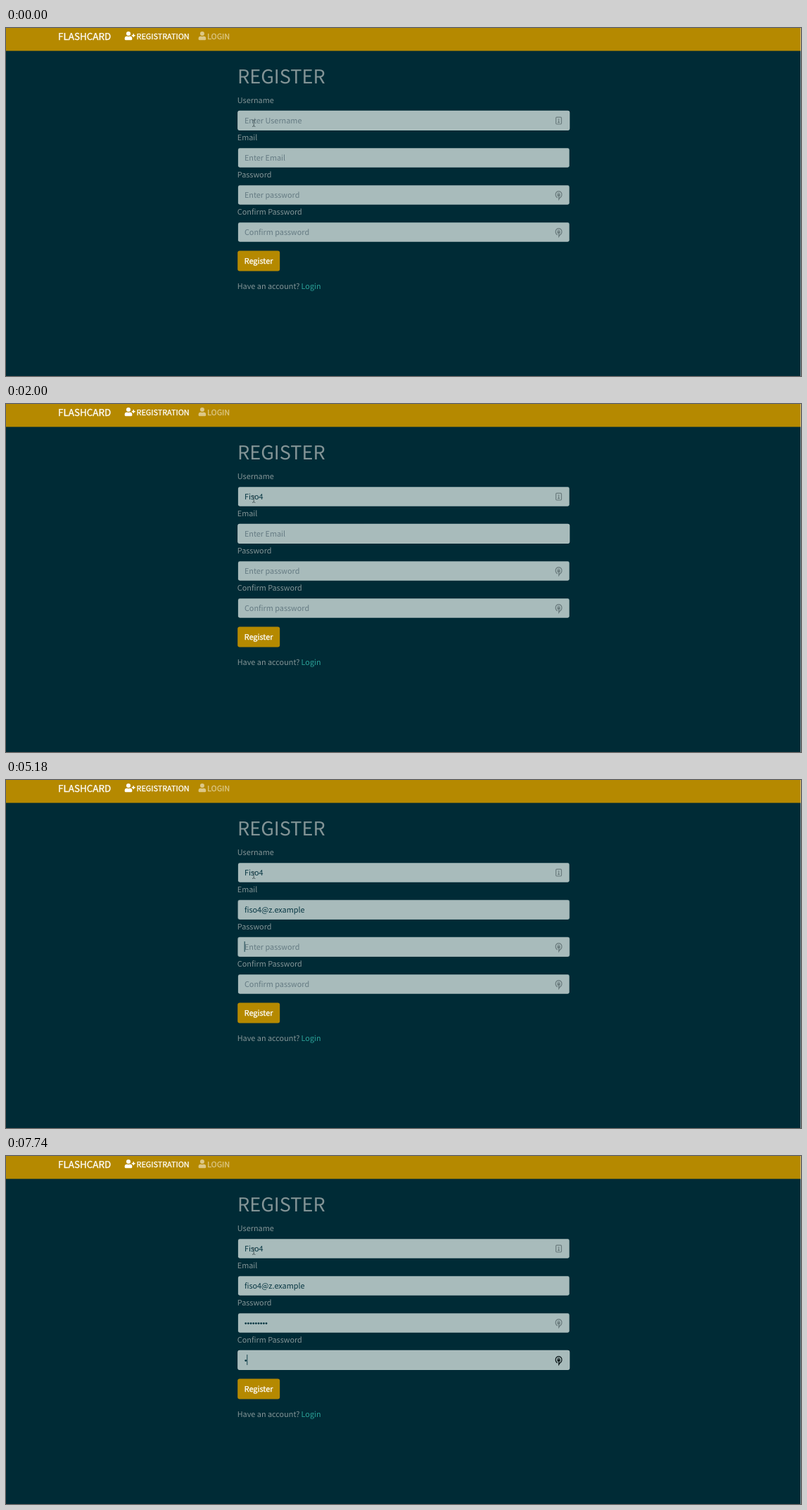
Animation of 1130x496 px, one loop 7.99 s. Source, as an HTML page:

```html
<!DOCTYPE html>
<html lang="en">
<head>
<meta charset="utf-8">
<title>Register form</title>
<style>
  html, body { margin: 0; width: 100%; height: 100%; overflow: hidden; background: #002b36; }
  svg { display: block; width: 1130px; height: 496px; }
  text {
    font: 10.86px "Noto Sans CJK JP", "Noto Sans CJK SC", "Noto Sans CJK", "Noto Sans", sans-serif;
    fill: #839496;
    text-rendering: geometricPrecision;
    white-space: pre;
  }
  .white { fill: #fff; }
  text.white { stroke: #fff; stroke-width: .3px; }
  .brand { font-size: 13.45px; }
  .title { font-size: 27.1px; }
  .link { fill: #2aa198; }
  .hint { fill: #657b83; }
  .value, .dot, .caret { fill: #073642; }
  .ring { fill: #bdcaca; }
  .box { fill: #a8bbbb; }
</style>
</head>
<body>
<svg id="stage" viewBox="0 0 1130 496">
  <defs>
    <g id="person">
      <circle cx="224" cy="128" r="128"/>
      <path d="M134 288h17q73 32 146 0h17q134 6 134 134v42q0 48-48 48H48q-48 0-48-48v-42q0-128 134-134z"/>
    </g>
    <g id="card" fill="none" stroke="currentColor">
      <rect x="-3.9" y="-4.9" width="7.8" height="9.8" rx="1.2" stroke-width="1.2"/>
      <path d="M0-.6V2.4M-1.4 2.6H1.4" stroke-width="1.3"/>
      <circle cy="-1.8" r=".6" stroke-width="1"/>
    </g>
    <g id="lock" fill="none" stroke="currentColor">
      <path d="M-1.8 3.7A4.4 4.8 0 1 1 1.8 3.7L.2 6V2" stroke-width="1.3"/>
      <path d="M-1.2-1.1V-2A1.2 1.2 0 0 1 1.2-2V-1.1" stroke-width="1"/>
      <rect x="-1.7" y="-1.1" width="3.4" height="2.7" fill="currentColor" stroke-width=".5"/>
    </g>
  </defs>

  <rect width="1130" height="496" fill="#002b36"/>
  <rect width="1130" height="32.6" fill="#b58900"/>
  <text class="white brand" x="74" y="16.6">FLASHCARD</text>
  <g class="white" transform="translate(168.7 5) scale(.0237)">
    <use href="#person"/>
    <path d="M528 160V320M448 240H608" stroke="#fff" stroke-width="64" stroke-linecap="round"/>
  </g>
  <text class="white" x="185.5" y="15.6">REGISTRATION</text>
  <g class="white" opacity=".53">
    <use href="#person" transform="translate(273.6 5) scale(.0237)"/>
    <text class="white" x="286" y="15.6">LOGIN</text>
  </g>

  <text class="title" x="329" y="79">REGISTER</text>
  <g id="form"></g>
  <rect x="329.2" y="317.6" width="60" height="28.9" rx="3" fill="#b58900"/>
  <text class="white" x="359.1" y="336.2" text-anchor="middle">Register</text>
  <text x="328.7" y="372.2">Have an account?</text>
  <text class="link" x="419.6" y="372.2">Login</text>

  <path d="M350 131Q352.2 131 352.2 132.5V139Q352.2 140.5 350 140.5M354.4 131Q352.2 131 352.2 132.5M352.2 139Q352.2 140.5 354.4 140.5"
        fill="none" stroke="#4f5f62" stroke-width="1"/>
  <rect x="1129" width="1" height="496" fill="#e8ecec" opacity=".55"/>
</svg>
<script>
const LOOP = 7990;
const FADE = 150;
const FADE_STEP = 30;
const LEFT = 338.9;
const DOT_PITCH = 3.66;

// Each key time adds one character; focusAt is when the field gains focus.
const fields = [
  { label: 'Username', hint: 'Enter Username', icon: 'card', value: 'Fiso4',
    focusAt: -FADE, keys: [400, 560, 720, 890, 1060] },
  { label: 'Email', hint: 'Enter Email', value: 'fiso4@z.example',
    focusAt: 1490,
    keys: [2150, 2340, 2530, 2720, 2910, 3360, 3610, 3770, 3930, 4090, 4250, 4490, 4610, 4740, 4860] },
  { label: 'Password', hint: 'Enter password', icon: 'lock', secret: true,
    focusAt: 5120, keys: [5820, 5960, 6100, 6230, 6410, 6540, 6660, 6840, 6970] },
  { label: 'Confirm Password', hint: 'Confirm password', icon: 'lock', secret: true, darkens: true,
    focusAt: 7250, keys: [7740] }
];
const caretOff = [[0, 40], [2000, 2150], [5670, 5820]];

function add(parent, tag, attrs, content = '') {
  const node = document.createElementNS('http://www.w3.org/2000/svg', tag);
  for (const name in attrs) node.setAttribute(name, attrs[name]);
  node.textContent = content;
  return parent.appendChild(node);
}

const form = document.getElementById('form');

fields.forEach((field, i) => {
  const top = 117.8 + 53 * i;
  const baseline = top + 18.3;
  add(form, 'text', { x: 328.8, y: top - 11.1 }, field.label);
  field.ring = add(form, 'rect', { class: 'ring', x: 329.2, y: top, width: 472.1, height: 28.3, rx: 3 });
  add(form, 'rect', { class: 'box', x: 329.9, y: top + .5, width: 470.8, height: 27.4, rx: 2.4 });
  field.hintNode = add(form, 'text', { class: 'hint', x: LEFT, y: baseline }, field.hint);
  if (field.secret) {
    field.dots = field.keys.map((_, n) => add(form, 'circle',
      { class: 'dot', cx: LEFT + DOT_PITCH * (n + .5), cy: top + 14.8, r: 1.4 }));
  } else {
    field.text = add(form, 'text', { class: 'value', x: LEFT, y: baseline });
  }
  if (field.icon) {
    field.iconNode = add(form, 'use',
      { href: '#' + field.icon, transform: `translate(785.6 ${top + 14.3})`, color: '#6b7c7e' });
  }
  field.caret = add(form, 'rect', { class: 'caret', y: top + 6.3, width: .9, height: 14.8 });
});

function fadeIn(t, start) {
  if (t < start) return 0;
  return Math.min(1, (Math.floor((t - start) / FADE_STEP) + 1) * FADE_STEP / FADE);
}

function show(node, visible) {
  node.style.display = visible ? '' : 'none';
}

function render(t) {
  const blinkOff = caretOff.some(([from, to]) => t >= from && t < to);

  fields.forEach((field, i) => {
    const next = fields[i + 1];
    const nextAt = next ? next.focusAt : LOOP;
    const typed = field.keys.filter(time => time <= t).length;
    let end = LEFT;

    show(field.hintNode, !typed);
    if (field.secret) {
      field.dots.forEach((dot, n) => show(dot, n < typed));
      end += typed * DOT_PITCH;
    } else {
      field.text.textContent = field.value.slice(0, typed);
      if (typed) end += field.text.getComputedTextLength();
    }

    field.ring.style.opacity = fadeIn(t, field.focusAt) * (1 - fadeIn(t, nextAt));
    field.caret.setAttribute('x', end - .2);
    show(field.caret, t >= field.focusAt && t < nextAt && !blinkOff);
    if (field.darkens) {
      field.iconNode.setAttribute('color', t >= field.focusAt ? '#0c1719' : '#6b7c7e');
    }
  });
}

const start = performance.now();
function frame() {
  render((performance.now() - start) % LOOP);
  requestAnimationFrame(frame);
}
frame();
</script>
</body>
</html>
```
